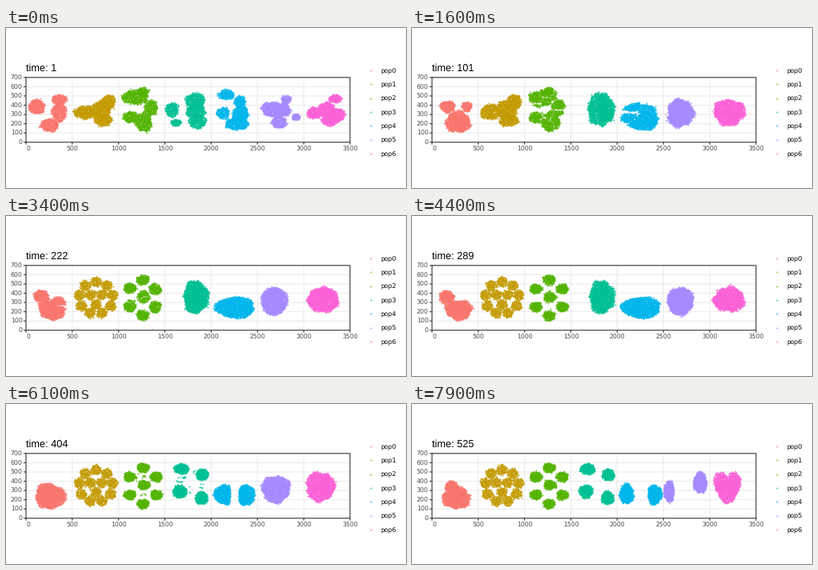
These frames come from a looping animation (500 by 200 pixels, 8000 ms). A matplotlib script:

```python
import numpy as np
import matplotlib.pyplot as plt
from matplotlib.animation import FuncAnimation

W, H, DPI = 500, 200, 100
FRAMES, INTERVAL = 80, 100
PT = 72 / DPI
LEFT, RIGHT, TOP, BOTTOM = 25, 430, 61.8, 142.8
COLORS = ["#F8766D", "#C49A00", "#53B400", "#00C094",
          "#00B6EB", "#A58AFF", "#FB61D7"]
CELLS = 1400  # per population
GOLDEN = np.pi * (3 - 5 ** 0.5)

plt.rcParams["text.hinting"] = "none"
rng = np.random.default_rng(4)
fig = plt.figure(figsize=(W / DPI, H / DPI), dpi=DPI, facecolor="white")
ax = fig.add_axes([0, 0, 1, 1])
ax.set_xlim(0, W)
ax.set_ylim(H, 0)
ax.axis("off")


def label(x, y, s, size=7.8, color="#4D4D4D", font="DejaVu Sans", **kw):
    kw = {"ha": "left", "va": "center_baseline", **kw}
    return ax.text(x, y, s, fontsize=size * PT, color=color, family=font, **kw)


def line(xs, ys, color, z):
    ax.plot(xs, ys, color=color, lw=1.07 * PT, zorder=z, snap=False,
            solid_capstyle="butt", solid_joinstyle="miter")


def dots(color, xs=(), ys=()):
    return ax.plot(xs, ys, "o", color=color, ms=1.9 * PT, mew=0,
                   alpha=0.85, zorder=3)[0]


def draw_panel():
    for x, v in zip(np.linspace(LEFT, RIGHT, 8), range(0, 3501, 500)):
        line([x, x], [TOP, BOTTOM], "#EBEBEB", 1)
        line([x, x], [BOTTOM, BOTTOM + 3], "#333333", 2)
        label(x if v else 28, 150.8, str(v), ha="center")
    for y, v in zip(np.linspace(BOTTOM, TOP, 8), range(0, 701, 100)):
        line([LEFT, RIGHT], [y, y], "#EBEBEB", 1)
        line([LEFT - 3, LEFT], [y, y], "#333333", 2)
        label(20.5, y, str(v), ha="right")
    line([LEFT, RIGHT, RIGHT, LEFT, LEFT],
         [TOP, TOP, BOTTOM, BOTTOM, TOP], "#333333", 4)
    for i, c in enumerate(COLORS):
        y = 53 + i * 17.3
        dots(c, [455.6], [y])
        label(468.7, y, f"pop{i}", color="black")


def blob(x, y, rx, ry, n):
    """Sunflower-filled ellipse with a ragged edge."""
    i = np.arange(n) + 0.5
    p, q, s = rng.uniform(0, 2 * np.pi, 3)
    a = i * GOLDEN + s
    r = np.sqrt(i / n) * (1 + 0.07 * np.sin(3 * a + p) + 0.06 * np.sin(7 * a + q))
    r += rng.normal(0, 0.05, n)
    return np.column_stack([x + rx * r * np.cos(a), y + ry * r * np.sin(a)])


def ring(x, y, rx, ry, n, size, start=-np.pi / 2):
    a = start + np.arange(n) * 2 * np.pi / n
    return [(x + rx * np.cos(t), y + ry * np.sin(t), *size) for t in a]


def halve(pts, axis=0):
    """Order points by repeated median cuts, so equal ranks lie alike."""
    if len(pts) < 2:
        return pts
    pts = pts[np.argsort(pts[:, axis])]
    m = len(pts) // 2
    return np.vstack([halve(pts[:m], 1 - axis), halve(pts[m:], 1 - axis)])


def cloud(blobs):
    area = np.array([b[2] * b[3] for b in blobs])
    cuts = np.rint(np.cumsum(area) / area.sum() * CELLS).astype(int)
    counts = np.diff(cuts, prepend=0)
    return halve(np.vstack([blob(*b, n) for b, n in zip(blobs, counts)]))


class Population:
    """Cells that drift from one arrangement of blobs to the next."""

    def __init__(self, color, stages):
        self.times = [t for t, _ in stages]
        self.clouds = [cloud(blobs) for _, blobs in stages]
        self.phase = rng.uniform(0, 2 * np.pi, (CELLS, 2))
        self.speed = rng.uniform(2, 9, (CELLS, 2))
        self.art = dots(color)

    def move(self, t):
        pos = np.interp(t, self.times, range(len(self.times)))
        k = min(int(pos), len(self.times) - 2)
        xy = self.clouds[k] + (pos - k) * (self.clouds[k + 1] - self.clouds[k])
        xy = xy + 0.6 * np.sin(self.phase + self.speed * t)
        self.art.set_data(xy[:, 0], xy[:, 1])


# Blobs are (x, y, rx, ry) in pixels
starts = [
    [(38, 98, 10, 9), (66, 89, 9, 6), (66, 105, 9, 11), (54, 121, 11, 8)],
    [(98, 105, 13, 8), (128, 92, 8, 9), (118, 102, 12, 11), (121, 115, 11, 7)],
    [(161, 86, 16, 9), (171, 79, 7, 5), (181, 99, 8, 9), (155, 111, 9, 7),
     (172, 117, 10, 12)],
    [(207, 102, 8, 9), (212, 118, 7, 4), (236, 91, 12, 10), (237, 104, 12, 9),
     (239, 117, 11, 8)],
    [(275, 83, 10, 6), (292, 92, 7, 7), (271, 106, 8, 7), (293, 107, 10, 10),
     (288, 119, 14, 8)],
    [(332, 101, 13, 9), (350, 89, 6, 5), (346, 102, 9, 8), (341, 117, 9, 8),
     (362, 111, 5, 4)],
    [(385, 106, 9, 7), (400, 102, 11, 9), (411, 88, 8, 5), (404, 115, 10, 7),
     (415, 108, 8, 8)],
]
wheel = (ring(112, 102, 21, 20, 9, (6.6, 6.3))
         + ring(112, 102, 8, 8, 3, (6.5, 6), np.pi / 2))
hexagon = ring(171, 102, 19, 22.5, 6, (7.5, 6)) + [(172, 101, 7.5, 6)]
block = [(237, 101, 15, 20)]
quarters = [(219, 81, 9, 6.5), (245, 88, 7.5, 7), (217, 109, 8.5, 8),
            (244, 117, 7.5, 8)]
bean = [(286, 114, 24, 13)]
pair = [(268, 112, 8.5, 12), (303, 113, 8.5, 12)]
egg = [(335, 106, 16, 17)]
heart = [(386, 98, 9, 13), (402, 98, 8, 13), (394, 109, 12, 14)]

later = [
    [(1.6, [(57, 117, 15, 13), (44, 98, 9, 7), (68, 98, 6, 6)]),
     (4.4, [(58, 117, 16, 12), (43, 101, 9, 8)]),
     (5.4, [(55, 115, 19, 15)]),
     (7.9, [(55, 117, 17, 13), (49, 103, 8, 7)])],
    [(1.4, starts[1]), (3.2, wheel), (7.9, wheel)],
    [(1.0, starts[2]), (3.9, hexagon), (7.9, hexagon)],
    [(1.8, block), (4.4, block), (5.3, quarters), (7.9, quarters)],
    [(2.4, bean), (5.4, bean), (6.6, pair), (7.9, pair)],
    [(1.6, egg), (5.4, egg), (6.8, [(339, 106, 19, 16)]),
     (7.9, [(321, 109, 6, 13), (360, 98, 8, 13)])],
    [(1.6, [(396, 105, 19, 16)]), (4.4, [(396, 104, 19, 15)]),
     (5.4, [(392, 103, 18, 18)]), (7.9, heart)],
]

draw_panel()
title = label(25, 53.5, "", 12.8, "black", "Liberation Sans", va="baseline")
pops = [Population(c, [(0, s), *more])
        for c, s, more in zip(COLORS, starts, later)]


def update(i):
    title.set_text(f"time: {int(1 + 6.72 * max(i - 1, 0))}")
    for p in pops:
        p.move(i * INTERVAL / 1000)
    return [title, *(p.art for p in pops)]


anim = FuncAnimation(fig, update, frames=FRAMES, interval=INTERVAL,
                     repeat=True, repeat_delay=0, blit=False)
plt.show()
```
